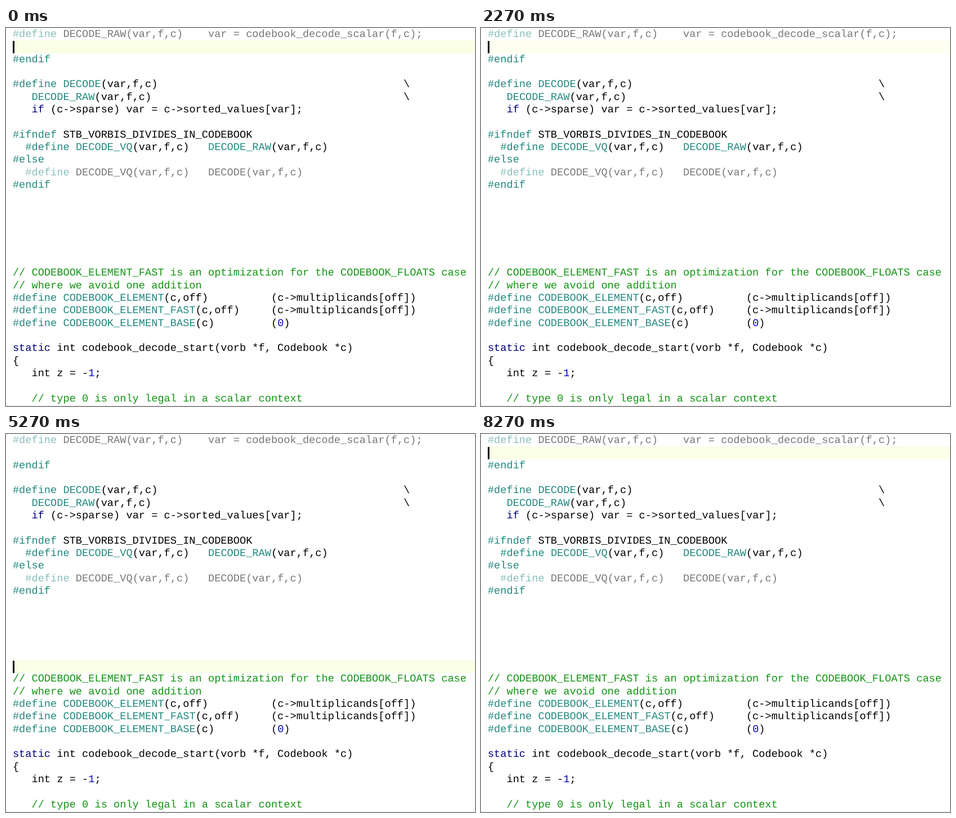
An HTML page for the animation above (8.74 s loop, 833 px wide and 672 px high).

```html
<!DOCTYPE html>
<html>
<head>
<meta charset="utf-8">
<style>
html, body { margin: 0; width: 100%; height: 100%; overflow: hidden; background: #fff; }
#stage { position: relative; width: 833px; height: 672px; overflow: hidden; }
#stage > * { position: absolute; margin: 0; }
#code {
  left: 11.9px; top: 0; color: #000; white-space: pre;
  font: 18.66px/22.34px "Liberation Mono", monospace;
  text-rendering: geometricPrecision;
}
#code div { height: 22.34px; }
#bar { left: 12px; width: 821px; height: 22.6px; }
#caret { left: 12px; width: 3px; height: 22px; background: #000; }
#edge { left: 0; top: 671px; width: 833px; height: 1px; background: #eee; }
.macro { color: #21887f; }
.word { color: #000080; }
.number { color: #0000c4; }
.comment { color: #129412; }
.off { opacity: .53; }
</style>
</head>
<body>
<div id="stage">
<div id="bar"></div>
<div id="code"></div>
<div id="caret"></div>
<div id="edge"></div>
</div>
<script>
// A leading ~ marks a line that the preprocessor skips.
const source = String.raw`~#define DECODE_RAW(var,f,c)    var = codebook_decode_scalar(f,c);

#endif

#define DECODE(var,f,c)                                       \
   DECODE_RAW(var,f,c)                                        \
   if (c->sparse) var = c->sorted_values[var];

#ifndef STB_VORBIS_DIVIDES_IN_CODEBOOK
  #define DECODE_VQ(var,f,c)   DECODE_RAW(var,f,c)
#else
~  #define DECODE_VQ(var,f,c)   DECODE(var,f,c)
#endif






// CODEBOOK_ELEMENT_FAST is an optimization for the CODEBOOK_FLOATS case
// where we avoid one addition
#define CODEBOOK_ELEMENT(c,off)          (c->multiplicands[off])
#define CODEBOOK_ELEMENT_FAST(c,off)     (c->multiplicands[off])
#define CODEBOOK_ELEMENT_BASE(c)         (0)

static int codebook_decode_start(vorb *f, Codebook *c)
{
   int z = -1;

   // type 0 is only legal in a scalar context`;

const span = (kind, text) => `<span class="${kind}">${text}</span>`;

function paint(line) {
  line = line.replace(/>/g, '&gt;');
  if (line.includes('//')) return `<div>${span('comment', line)}</div>`;
  if (line[0] === '~') {
    return `<div class="off">${line.slice(1).replace(/#\w+/, m => span('macro', m))}</div>`;
  }
  return '<div>' + line.replace(
    /(#\w+|\b(?:DECODE|CODEBOOK_ELEMENT)\w*)|\b(static|if)\b|\b\d\b/g,
    (m, macro, word) => span(macro ? 'macro' : word ? 'word' : 'number', m)) + '</div>';
}

const el = id => document.getElementById(id);
el('code').innerHTML = source.split('\n').map(paint).join('');

const LOOP = 8740, ROW = 22.34;
// [time in ms, row of the caret]
const jumps = [[0, 1], [2730, 3], [3130, 7], [3600, 13], [4130, 24],
  [5130, 18], [5730, 7], [6400, 3], [6930, 1]];
const bright = [250, 255, 229], pale = [255, 255, 240];

function draw(now) {
  const t = now % LOOP;
  const row = jumps.filter(j => j[0] <= t).pop()[1];
  // The end of the loop dissolves into its start.
  const fade = Math.min(1, Math.max(0, (t - 265) / 935));
  const tint = t < 2730 ? fade : 0;
  const mix = bright.map((c, i) => c + (pale[i] - c) * tint);
  el('bar').style.background = `rgb(${mix.map(Math.round)})`;
  el('bar').style.top = row * ROW + 'px';
  el('caret').style.top = row * ROW + .4 + 'px';
  el('caret').style.opacity = t < 1800 ? 1 - fade : 1;
}

const start = performance.now();
function tick() {
  draw(performance.now() - start);
  requestAnimationFrame(tick);
}
tick();
</script>
</body>
</html>
```
